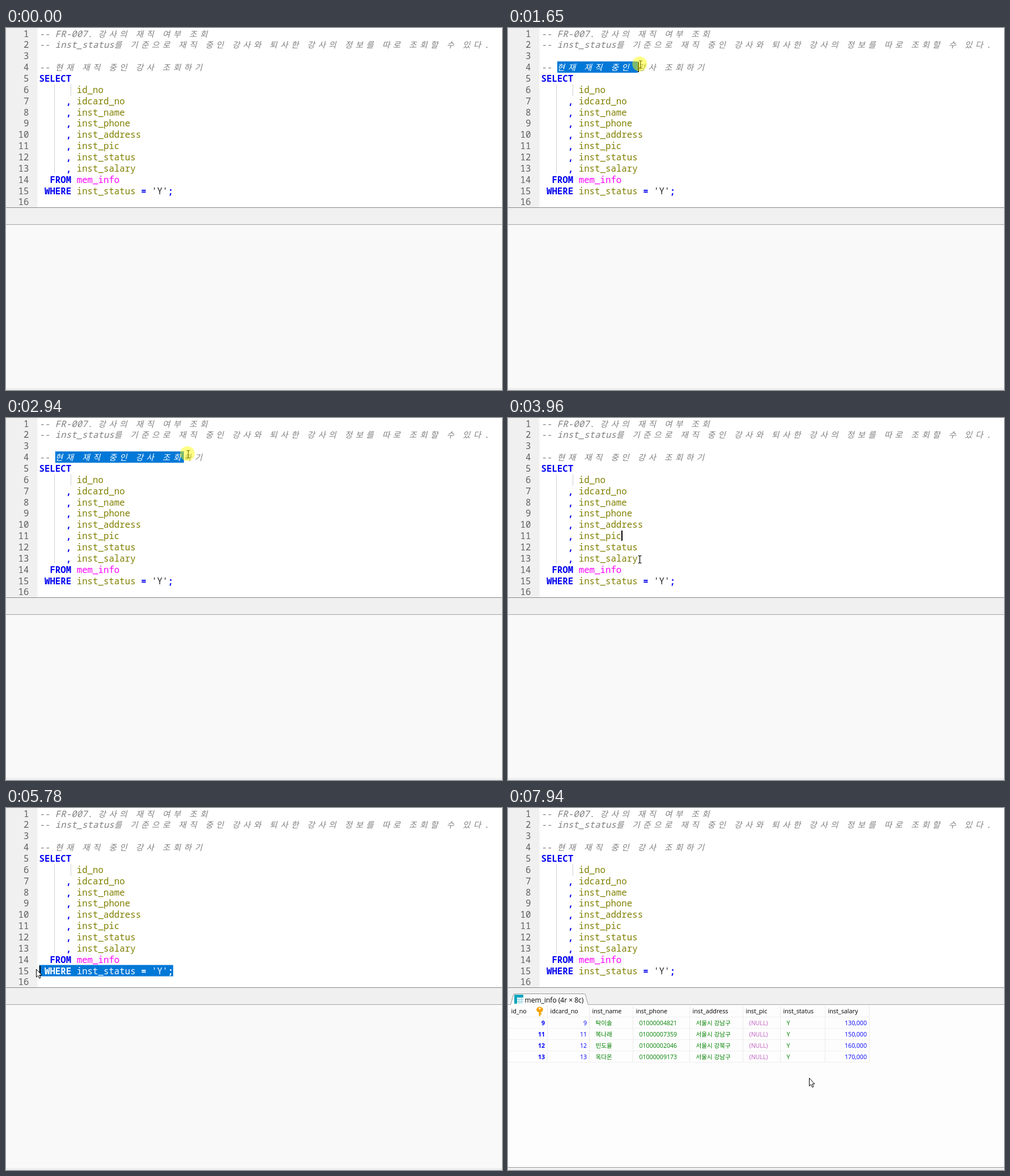
These frames come from a looping animation (875 px wide and 640 px high, 8000 ms). An HTML page:

```html
<!DOCTYPE html>
<html lang="ko">
<head>
<meta charset="utf-8">
<title>SQL editor</title>
<style>
html, body { margin: 0; width: 100%; height: 100%; overflow: hidden; background: #fff; }
svg { display: block; }
text { white-space: pre; }
.code { font: 500 15.76px "Noto Sans Mono", monospace; }
.ko { font: 14.5px "Noto Sans CJK KR", "Noto Sans CJK", sans-serif; }
.num { fill: #606060; text-anchor: end; }
.note { fill: #808080; font-style: italic; }
.key { fill: #0000f0; font-weight: bold; }
.field { fill: #808000; }
.table { fill: #ff00ff; }
.str { fill: #222; }
.picked text { fill: #fff; }
.guide { stroke: #a0a0a0; stroke-dasharray: 1 1; }
.ui { font: 500 10.8px "Open Sans", "Noto Sans CJK KR", "Noto Sans CJK", sans-serif; fill: #000; }
.tab { font-size: 12px; }
.cell { font-size: 10.6px; }
.int { fill: #0000ff; text-anchor: end; }
.pk { font-weight: bold; }
.txt { fill: #008000; }
.null { fill: #c060c0; }
</style>
</head>
<body>
<svg width="875" height="640" viewBox="0 0 875 640" xmlns="http://www.w3.org/2000/svg">
  <defs><clipPath id="clip"><rect id="clipBox" height="20"/></clipPath></defs>
  <rect width="875" height="640" fill="#fff"/>
  <rect width="55" height="317" fill="#f0f0f0"/>
  <path d="M56.5 0V317" stroke="#f4f4f4"/>
  <path class="guide" d="M85.5 100V258M114.5 100V119"/>
  <g id="numbers"></g>
  <g id="code"></g>
  <rect id="mark" height="20" fill="#0078d7"/>
  <g id="picked" class="picked" clip-path="url(#clip)"></g>
  <rect id="caret" width="2" height="18" fill="#000"/>

  <rect y="317" width="875" height="31" fill="#f0f0f0"/>
  <path d="M0 317.5H875" stroke="#888"/>
  <path d="M0 347.5H875" stroke="#a5a5a5"/>
  <rect y="348" width="875" height="288" fill="#f9f9f9"/>
  <rect y="636" width="875" height="4" fill="#f0f0f0"/>

  <g id="result">
    <rect y="348" width="875" height="287" fill="#fdfdfd"/>
    <path d="M0 635.5H875" stroke="#999"/>
    <path d="M4.5 348L9.5 330Q10 328.500 12 328.500H134Q136 328.500 136.500 330L141.500 348" fill="#fbfbfb" stroke="#999"/>
    <rect x="11" y="330" width="16" height="16" fill="#10a5bd"/>
    <path d="M16 335H27V346H16Z" fill="#e2f5f8"/>
    <path d="M19.500 335V346M23.500 335V346M16 338.500H27M16 342.500H27" stroke="#9ad5e0"/>
    <text class="ui tab" x="29.500" y="344">mem_info (4r × 8c)</text>
    <g fill="#f5a30a">
      <path fill-rule="evenodd" d="M56 351.500a5.800 5 0 1 0 .01 0ZM56 353a1.700 1.500 0 1 1-.01 0Z"/>
      <path d="M54.500 360H57.500V362.500H59.500V364.500H57.500V366L56 369L54.500 367Z"/>
    </g>
  </g>

  <path id="beam" d="M-3 -6.500H-1L0 -5.500L1 -6.500H3M0 -5.500V5.500M-3 6.500H-1L0 5.500L1 6.500H3" fill="none" stroke="#000" stroke-width="1.200"/>
  <circle id="halo" r="13" fill="#ff0" fill-opacity=".48"/>
  <path id="arrow" d="M.5 .5V14.500L3.600 11.700L5.800 16.700L8 15.700L5.900 10.900H10Z" fill="#fff" stroke="#000"/>
</svg>
<script>
const LOOP = 8000, LEFT = 58.5, CELL = 9.456, ROW = 19.86;
const $ = id => document.getElementById(id);
const colX = col => LEFT + col * CELL;
const rowTop = row => (row - 1) * ROW - 0.5;
const baseline = row => 15.5 + (row - 1) * ROW;

function add(parent, tag, attrs, text) {
  const el = document.createElementNS("http://www.w3.org/2000/svg", tag);
  for (const k in attrs) el.setAttribute(k, attrs[k]);
  if (text) el.textContent = text;
  return parent.appendChild(el);
}

// Hangul takes two cells per glyph, everything else one.
const cells = ch => /[가-힣]/.test(ch) ? 2 : 1;

function codeRun(row, col, style, text) {
  for (const run of text.match(/[가-힣]+|[^가-힣]+/g)) {
    const size = cells(run);
    const x = size === 2 ? [...run].map((_, i) => colX(col + 2 * i)).join(" ") : colX(col);
    add($("code"), "text", { class: `${size === 2 ? "ko" : "code"} ${style}`, x, y: baseline(row) }, run);
    col += run.length * size;
  }
}

// Columns at which the caret can stand in a line.
function stops(text) {
  const cols = [0];
  for (const ch of text) cols.push(cols[cols.length - 1] + cells(ch));
  return cols;
}

// Result columns: name, width, style
const columns = [
  ["id_no", 69, "int pk"], ["idcard_no", 74, "int"], ["inst_name", 77, "txt"], ["inst_phone", 100, "txt"],
  ["inst_address", 94, "txt"], ["inst_pic", 66, "null"], ["inst_status", 79, "txt"], ["inst_salary", 78, "int"]
];
const people = [
  [9, "탁이솔", "01000004821", "강남구", "130,000"],
  [11, "복나래", "01000007359", "강남구", "150,000"],
  [12, "빈도율", "01000002046", "강북구", "160,000"],
  [13, "옥다온", "01000009173", "강남구", "170,000"]
];
const note = "-- 현재 재직 중인 강사 조회하기";
const where = " WHERE inst_status = 'Y';";

function buildCode() {
  for (let n = 1; n <= 16; n++)
    add($("numbers"), "text", { class: "code num", x: 40.5, y: baseline(n) }, String(n));
  codeRun(1, 0, "note", "-- FR-007. 강사의 재직 여부 조회");
  codeRun(2, 0, "note", "-- inst_status를 기준으로 재직 중인 강사와 퇴사한 강사의 정보를 따로 조회할 수 있다.");
  codeRun(4, 0, "note", note);
  codeRun(5, 0, "key", "SELECT");
  columns.forEach(([name], i) => {
    if (i) codeRun(6 + i, 5, "key", ",");
    codeRun(6 + i, 7, "field", name);
  });
  codeRun(14, 2, "key", "FROM");
  codeRun(14, 7, "table", "mem_info");
  const styles = { WHERE: "key", inst_status: "field", "=": "key", "'Y'": "str", ";": "key" };
  for (const word in styles) codeRun(15, where.indexOf(word), styles[word], word);
  for (const el of $("code").children) $("picked").append(el.cloneNode(true));
}

function buildGrid() {
  const grid = $("result");
  const rows = people.map(([id, name, phone, area, pay]) =>
    [id, id, name, phone, "서울시 " + area, "(NULL)", "Y", pay]);
  for (let i = 0; i <= rows.length; i++)
    add(grid, "path", { d: `M0 ${Math.round(369 + i * 19.9) + 0.5}H637`, stroke: "#f0f0f0" });
  let left = 0;
  columns.forEach(([name, width, style], c) => {
    const right = left + width;
    add(grid, "path", { d: `M${right + 0.5} 349V449`, stroke: "#ebebeb" });
    add(grid, "text", { class: "ui", x: left + 5.5, y: 363 }, name);
    const x = style.startsWith("int") ? right - 4 : left + 11.5;
    rows.forEach((row, r) =>
      add(grid, "text", { class: `ui cell ${style}`, x, y: 384 + r * 19.9 }, String(row[c])));
    left = right;
  });
}

// Pointer moves: from, to, target x, target y, upward bow
const moves = [
  [190, 930, 90, 66, 275],
  [1060, 1850, 259, 63, 0],
  [1920, 2400, 320, 63, 0],
  [2980, 3500, 209, 199, 0],
  [3830, 3960, 231, 249, 0],
  [3960, 4430, 326, 290, 0],
  [4560, 5310, 76, 290, -8],
  [5310, 5510, 53, 284.5, 0],
  [5850, 6580, 440.5, 254, 290],
  [7310, 7650, 574, 330, 40],
  [7650, 7940, 531, 477, 0]
];

function pointer(t) {
  let x = 795, y = 600;
  for (const [from, to, toX, toY, bow] of moves) {
    if (t < from) break;
    const k = Math.min(1, (t - from) / (to - from)), e = k * k * (3 - 2 * k);
    x += (toX - x) * e;
    y += (toY - y) * e - bow * Math.sin(Math.PI * e);
  }
  return [x, y];
}

// Button held: from, to, fade-out length
const presses = [[1060, 3060, 100], [3700, 3860, 60], [4470, 5780, 1], [6710, 7110, 120]];

function halo(t) {
  const press = presses.find(([from, to]) => t >= from && t < to);
  return press ? Math.min(1, (press[1] - t) / press[2]) : 0;
}

const nearest = (cols, x) =>
  cols.reduce((a, b) => Math.abs(colX(b) - x) < Math.abs(colX(a) - x) ? b : a);

// Row, anchor column and moving column
function selection(t) {
  if (t >= 1060 && t < 3700) return [4, 3, nearest(stops(note), pointer(Math.min(t, 2400))[0])];
  if (t >= 4560 && t < 6710) return [15, where.length, nearest(stops(where), pointer(Math.min(t, 5510))[0])];
  return null;
}

function caretAt(t, sel) {
  if (sel) return t < 2400 || t > 4500 ? [sel[0], sel[2]] : null;
  if (t >= 3700 && t < 4560) return [11, 15];
  if (t >= 6710 && t < 7310) return [13, 18];
  return null;
}

function show(el, on) { el.style.display = on ? "" : "none"; }
function place(el, x, y) { el.setAttribute("transform", `translate(${x} ${y})`); }

function draw(t) {
  const [x, y] = pointer(t), sel = selection(t), caret = caretAt(t, sel);
  const inEditor = y < 318 && x >= 57;
  show($("result"), t >= 6180);
  show($("beam"), t >= 190 && inEditor);
  show($("arrow"), t >= 190 && !inEditor);
  place($("beam"), x + 1.5, y + 1);
  place($("arrow"), x, y);
  place($("halo"), x, y);
  $("halo").style.opacity = halo(t);

  const [row, a, b] = sel || [1, 0, 0];
  for (const box of [$("mark"), $("clipBox")]) {
    box.setAttribute("x", colX(Math.min(a, b)));
    box.setAttribute("y", rowTop(row));
    box.setAttribute("width", Math.abs(a - b) * CELL);
  }
  show($("caret"), caret);
  if (caret) place($("caret"), Math.round(colX(caret[1])), Math.round(rowTop(caret[0]) + 1));
}

buildCode();
buildGrid();
const start = performance.now();
function tick() {
  draw((performance.now() - start) % LOOP);
  requestAnimationFrame(tick);
}
tick();
</script>
</body>
</html>
```
